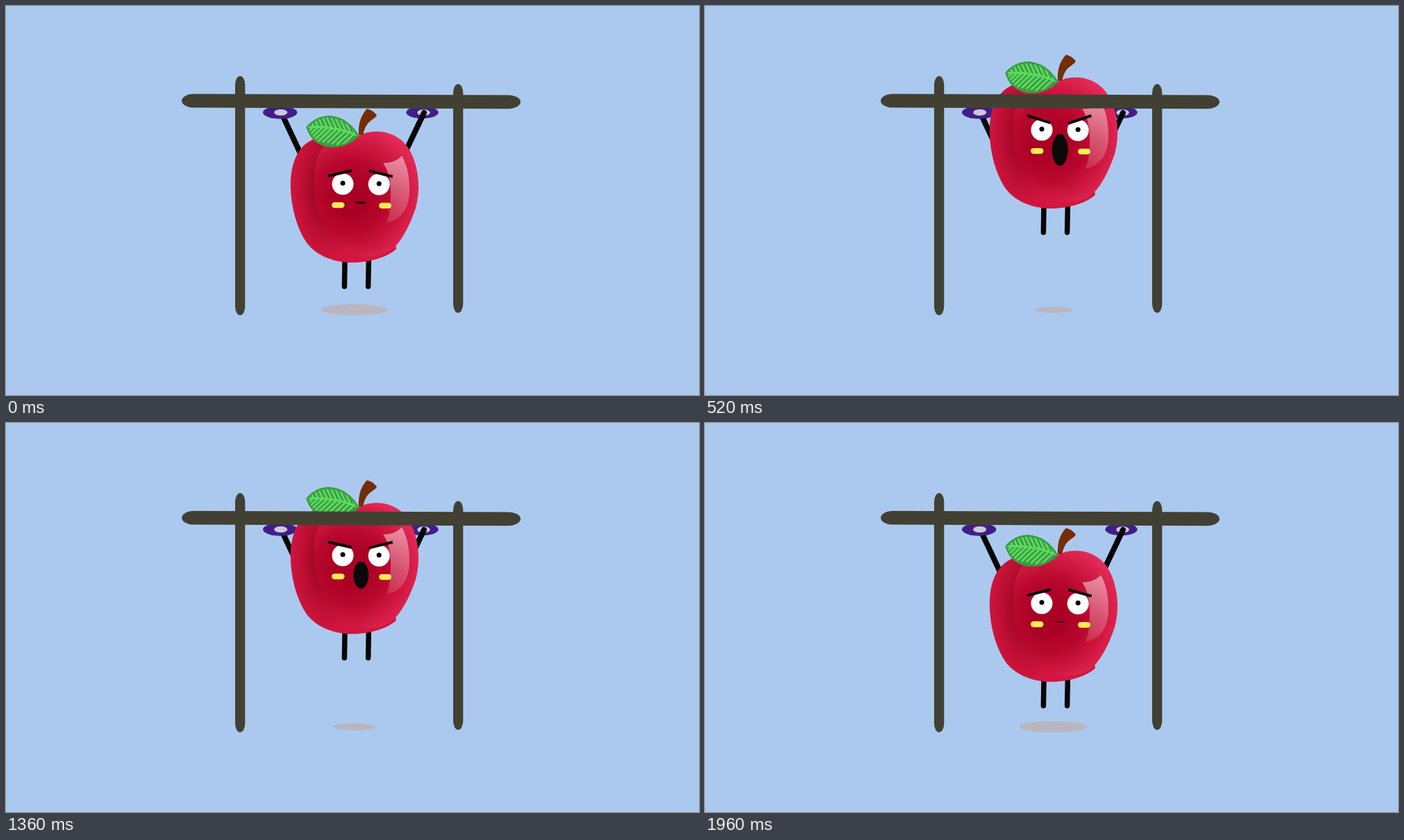
These frames come from a looping animation (998 by 561 pixels, 2440 ms). An HTML page:

```html
<!DOCTYPE html>
<html lang="en">
<head>
<meta charset="utf-8">
<title>Apple pull-ups</title>
<style>
html, body { margin: 0; width: 100%; height: 100%; overflow: hidden; background: #abc9ef; }
svg { display: block; width: 100%; height: 100%; }
.line { fill: none; stroke: #060606; }
</style>
</head>
<body>
<svg viewBox="0 0 998 561">
  <defs>
    <radialGradient id="back" gradientUnits="userSpaceOnUse" cx="0" cy="0" r="1" gradientTransform="translate(462 264) scale(55 106)">
      <stop offset=".3" stop-color="#a00726"/>
      <stop offset=".65" stop-color="#bd0f33"/>
      <stop offset="1" stop-color="#d3163f"/>
    </radialGradient>
    <radialGradient id="front" gradientUnits="userSpaceOnUse" cx="496" cy="275" r="108">
      <stop offset=".2" stop-color="#a90024"/>
      <stop offset=".5" stop-color="#b9082e"/>
      <stop offset=".75" stop-color="#d01942"/>
      <stop offset="1" stop-color="#e62b59"/>
    </radialGradient>
    <linearGradient id="gloss" x1="0" y1="0" x2="0" y2="1">
      <stop offset="0" stop-color="#fff" stop-opacity=".5"/>
      <stop offset="1" stop-color="#fff" stop-opacity=".13"/>
    </linearGradient>
    <path id="leafShape" d="M432.5 174C442 162 455 157 468 158C487 160 500 172 508.500 187C496 199 481 204 467 203C448 201 437 190 432.500 174Z"/>
    <clipPath id="leafClip"><use href="#leafShape"/></clipPath>
  </defs>

  <ellipse id="shadow" cx="501.700" cy="438" fill="#b9b6bf"/>

  <path class="line" stroke-width="8" d="M396 153L427 219"/>
  <g fill="#411e87">
    <ellipse cx="394.700" cy="153.500" rx="24.700" ry="9.300"/>
    <ellipse cx="599.500" cy="153.500" rx="23.200" ry="8.700"/>
  </g>
  <g fill="#cac8d9">
    <ellipse cx="395.700" cy="153.500" rx="9.500" ry="4.500"/>
    <ellipse cx="601.500" cy="153.800" rx="9.300" ry="4.500"/>
  </g>
  <path class="line" stroke-width="8" stroke-linecap="round" d="M602 154L573.500 214"/>

  <g id="apple">
    <path class="line" stroke-width="7.500" stroke-linecap="round" d="M488.200 355L487.400 404M522.600 352L521.600 404"/>
    <path fill="url(#back)" d="M508 187C480 182 450 184 432 198C412 214 408 245 410.500 272C413 300 422 325 433 341C448 361 475 369.500 497 369.500C525 369.500 548 362 562 350L540 200Z"/>
    <path fill="url(#front)" d="M508 187C516 182 525 180 535 180.500C560 181 578 196 586 217C596 243 596 268 590 291C584 308 578 322 570 334C560 350 545 361 522 361C492 360 471 341 458 318C446 295 442 268 444 240C447 215 455 203 466 192C480 183 497 185 508 187Z"/>
    <path fill="url(#gloss)" d="M543 226C555 226 564 222 570 215.500C578 230 581 245 581 265C581 290 570 308 548 312C553 300 554 285 554 268C554 252 551 237 543 226Z"/>
    <path fill="#752d06" d="M508 186C507 170 511 157 520 147.800C526 149.500 530 152 534 157C531 164 518 164 514.500 185Z"/>
    <use href="#leafShape" fill="#3a9c41"/>
    <g clip-path="url(#leafClip)" fill="none" stroke="#5edb60">
      <path stroke-width="3" d="M433 174Q475 172 508 187"/>
      <path id="veins" stroke-width="2.800"/>
      <use href="#leafShape" stroke="#3a9c41" stroke-width="5"/>
    </g>
    <g fill="#fff">
      <circle cx="485" cy="256.300" r="15.500"/>
      <circle cx="537.200" cy="256.800" r="15.500"/>
    </g>
    <circle cx="485" cy="255" r="3.500"/>
    <circle cx="537.200" cy="255.800" r="3.500"/>
    <g fill="#fdec52">
      <rect x="469" y="282.400" width="18.500" height="8.400" rx="4.200"/>
      <rect x="537" y="283.200" width="18" height="8.400" rx="4.200"/>
    </g>
    <path id="browL" class="line" stroke-width="4" d="M-17.500 0H17.500"/>
    <path id="browR" class="line" stroke-width="4" d="M-17.500 0H17.500"/>
    <ellipse id="mouth" cx="511.200" fill="#0c0809"/>
  </g>

  <g fill="#414033">
    <rect x="330" y="101" width="14.300" height="345" rx="7.150" ry="13"/>
    <rect x="644" y="112.500" width="14.300" height="330" rx="7.150" ry="13"/>
    <rect x="253" y="127.600" width="488" height="19.800" rx="18" ry="9.900" transform="rotate(.2 497 137.500)"/>
  </g>
</svg>
<script>
const $ = id => document.getElementById(id);
const LOOP = 2440, STEP = 40, REST = 1960, HEIGHT = 88.7;

function set(id, attrs) {
  for (const name in attrs) $(id).setAttribute(name, attrs[name]);
}

let veins = "";
for (let i = 0; i < 10; i++) {
  const x = 443 + i * 6.6, y = 173.5 + 11 * ((x - 436) / 72) ** 2;
  veins += `M${x} ${y}l-8 -17M${x} ${y}l-20 19`;
}
set("veins", { d: veins });

// Height above the hanging pose: two steady pull-ups, then a rest.
function lift(t) {
  if (t >= REST) return 0;
  const u = (0.1788 * t + 3.2) % (2 * HEIGHT);
  return Math.min(u, 2 * HEIGHT - u);
}

function draw(t) {
  const h = lift(t), rx = 48.8 - 0.26 * h;
  set("apple", { transform: `translate(0 ${3.7 - h})` });
  set("shadow", { rx, ry: rx * 0.166 });
  set("mouth", { cy: 283 + 0.025 * h, rx: 7.4 + 0.05 * h, ry: 0.7 + 0.275 * h });
  set("browL", { transform: `translate(480.8 240.8) rotate(${0.4 * h - 14.5})` });
  set("browR", { transform: `translate(539.8 241.3) rotate(${15.3 - 0.42 * h})` });
}

const start = performance.now();
function tick() {
  const t = (performance.now() - start) % LOOP;
  draw(Math.floor(t / STEP) * STEP);
  requestAnimationFrame(tick);
}
tick();
</script>
</body>
</html>
```
